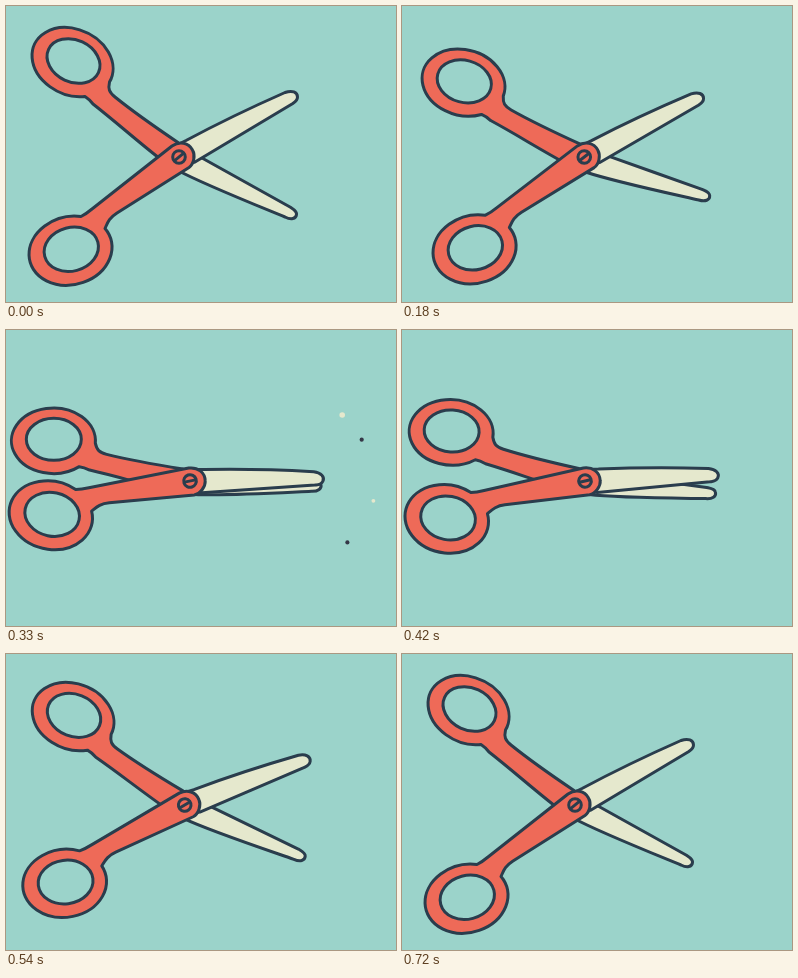
Write an HTML page that moves like this. It is 390 by 296 pixels and loops after 0.93 s.

```html
<!DOCTYPE html>
<html lang="en">
<head>
<meta charset="utf-8">
<title>Scissors</title>
<style>
  html, body { margin: 0; width: 100%; height: 100%; overflow: hidden; background: #9bd3ca; }
  svg { display: block; width: 390px; height: 296px; }
  .ink { stroke: #2a3d4d; stroke-width: 3; stroke-linejoin: round; stroke-linecap: round; }
  .red { fill: #ee6a58; }
  .cream { fill: #e5e8cd; }
  .hole { fill: #9bd3ca; }
  .dark { fill: #353747; }
</style>
</head>
<body>
<svg viewBox="0 0 390 296">
  <g id="smear" class="ink cream">
    <path d="M190 140C232 141 252 136 270 126C282 118 287 111 300 112C311 113 319 124 318 131C317 135 300 137 285 139C270 141 240 143 200 146Z"/>
    <path d="M192 163C240 162 262 167 274 178C282 186 288 197 300 194C312 190 315 174 308 163L200 152Z"/>
  </g>
  <g id="back" class="ink">
    <path class="cream" d="M172 164.5C195 177 240 195 279 211C285 214 290 213 290.5 208.5C291 205 287 203 284 201C255 185 225 168 196 152L176 145Z"/>
    <path class="red" d="M79 90.5A42 32.8 25 1 1 103.5 76C102 83 103 86 109 91C130 108 152 123 172 136.5L178 150L165 158L153 152C130 134 110 116 87 98Q83 93 79 90.5Z"/>
    <ellipse class="hole" rx="27.5" ry="21" transform="translate(67.5 55) rotate(25)"/>
  </g>
  <g id="front" class="ink">
    <path class="cream" d="M174 137.5L180 134.5C208 119.5 245 101.5 279 86.5C286 84 291.5 86 291.5 91C291.5 95 289 96 286 98L189 156L176 160Z"/>
    <path class="red" d="M75 210.5A42 34 -15 1 0 99 222.5C101.5 217 103 212 111 207L183 161.5C188 158 189.5 149 186.5 144C182.5 136.5 173.5 135 166 140L86 203Q80 208 75 210.5Z"/>
    <ellipse class="hole" rx="27.5" ry="21.8" transform="translate(65.3 243.3) rotate(-15)"/>
    <circle class="red" cx="173" cy="151" r="6.3"/>
    <path d="M169.5 153.8L176.5 148.2"/>
  </g>
  <g id="bits"></g>
</svg>
<script>
const $ = id => document.getElementById(id);
const LOOP = 930, TICK = 30;
const PIVOT = [173, 151], IMPACT = [318, 150];

// Smooth monotone curve through [step, value] knots
function track(knots) {
  const slope = i => (knots[i + 1][1] - knots[i][1]) / (knots[i + 1][0] - knots[i][0]);
  const tangent = knots.map((_, i) => {
    if (i === 0 || i === knots.length - 1) return 0;
    const a = slope(i - 1), b = slope(i);
    return a * b > 0 ? 2 * a * b / (a + b) : 0;
  });
  return k => {
    const last = knots.length - 1;
    if (k >= knots[last][0]) return knots[last][1];
    let i = 0;
    while (k >= knots[i + 1][0]) i++;
    const [x0, y0] = knots[i], [x1, y1] = knots[i + 1];
    const h = x1 - x0, u = (k - x0) / h, v = 1 - u;
    return v * v * (1 + 2 * u) * y0 + u * u * (3 - 2 * u) * y1
      + h * u * v * (v * tangent[i] - u * tangent[i + 1]);
  };
}

const frontAngle = track([[0, 0], [3, -5.5], [4, -5.8], [6, 13], [7, 27.3], [9, 27], [12, 25.5], [15, 7.7], [17, 2.5], [20, 0]]);
const backAngle = track([[0, 0], [3, -5], [4, -5.3], [6, -17], [7, -25.3], [9, -25], [12, -21.5], [15, -3.2], [17, -0.4], [20, 0]]);
const backDrop = track([[0, 0], [3, 2], [7, 0.9], [12, 0.6], [20, 0]]);
const shift = track([[0, 0], [3, 6], [7, 11], [9, 11], [12, 10], [15, 5.7], [17, 2], [20, 0]]);

const dot = r => `M${-r} 0a${r} ${r} 0 1 0 ${2 * r} 0a${r} ${r} 0 1 0 ${-2 * r} 0Z`;
const bits = [
  [325, 125, 'cream', dot(7)],
  [332.5, 134.5, 'dark', dot(5.2)],
  [347, 125, 'cream', 'M-9 14L8 -18V6L-3 13Z'],
  [337, 158, 'cream', dot(4.8)],
  [357, 166, 'cream', 'M-17 -5L16 2L14 6.5L-16 -1Z'],
  [327, 174, 'dark', dot(5.2)],
  [370, 150.5, 'dark', 'M-25 0.5L24 -8V7.5Z'],
].map(([x, y, fill, d]) => {
  const el = document.createElementNS('http://www.w3.org/2000/svg', 'path');
  el.setAttribute('class', fill);
  el.setAttribute('d', d);
  $('bits').append(el);
  return { el, x, y };
});

const show = (el, on) => { el.style.display = on ? '' : 'none'; };

function pose(el, dx, dy, angle) {
  el.setAttribute('transform', `translate(${dx} ${dy}) rotate(${angle} ${PIVOT})`);
}

function burst(age) {
  const live = age >= 0 && age < 3;
  show($('bits'), live);
  if (!live) return;
  const spread = 1 + age * (1.2 - 0.2 * age);
  const size = 1 - 0.3 * age;
  for (const { el, x, y } of bits) {
    const px = IMPACT[0] + (x - IMPACT[0]) * spread;
    const py = IMPACT[1] + (y - IMPACT[1]) * spread;
    el.setAttribute('transform', `translate(${px} ${py}) scale(${size})`);
  }
}

function draw(now) {
  // Five poses are spread over every six ticks
  const slot = Math.floor(now % LOOP / TICK);
  const k = slot - Math.floor((slot + 3) / 6);
  const dx = shift(k);
  pose($('front'), dx, 0, frontAngle(k));
  pose($('back'), dx, backDrop(k), backAngle(k));
  show($('smear'), k === 7);
  burst(k - 7);
}

const start = performance.now();
function loop() {
  draw(performance.now() - start);
  requestAnimationFrame(loop);
}
loop();
</script>
</body>
</html>
```
